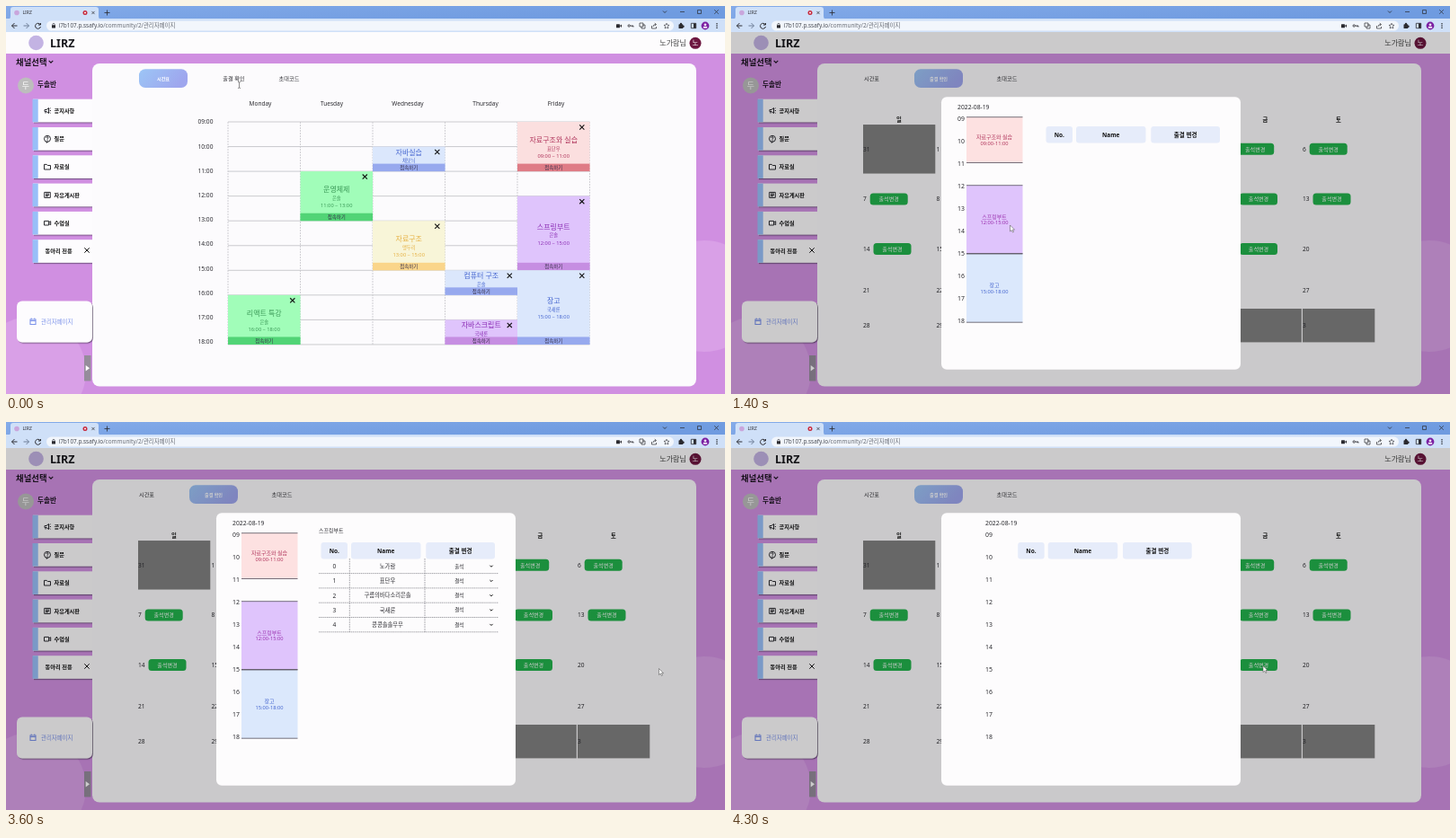
Animation, 800 px wide and 432 px high, one loop 4.4 s. Source, as an HTML page:

```html
<!DOCTYPE html>
<html lang="ko">
<head>
<meta charset="utf-8">
<title>관리자페이지</title>
<style>
  html, body { margin: 0; width: 100%; height: 100%; overflow: hidden; background: #d08fe1; }
  svg { display: block; width: 100vw; height: 100vh; }
  text { font-family: "Noto Sans", "Noto Sans CJK KR", "Noto Sans CJK", sans-serif; white-space: pre; }
</style>
</head>
<body>
<svg id="stage" viewBox="0 0 800 432"></svg>
<script>
const INK = '#2b2b30';

// Markup helpers
const rect = (x, y, w, h, fill, r = 0, extra = '') =>
  `<rect x="${x}" y="${y}" width="${w}" height="${h}" rx="${r}" fill="${fill}" ${extra}/>`;
const circle = (x, y, r, fill) => `<circle cx="${x}" cy="${y}" r="${r}" fill="${fill}"/>`;
const text = (s, x, y, size, fill = INK, anchor = 'middle', weight = 400) =>
  `<text x="${x}" y="${y + size * 0.37}" font-size="${size}" fill="${fill}" text-anchor="${anchor}" font-weight="${weight}">${s}</text>`;
const left = (s, x, y, size, fill, weight) => text(s, x, y, size, fill, 'start', weight);
const stroke = (d, color = INK, width = 1, extra = '') =>
  `<path d="${d}" fill="none" stroke="${color}" stroke-width="${width}" ${extra}/>`;
const icon = (x, y, d, color = INK, width = 1) =>
  `<g transform="translate(${x} ${y})">${stroke(d, color, width)}</g>`;
const group = (id, body) => `<g id="${id}">${body}</g>`;
const cross = (x, y, r, color = '#111', width = 1) =>
  icon(x, y, `M${-r} ${-r}L${r} ${r}M${r} ${-r}L${-r} ${r}`, color, width);
const range = n => [...Array(n).keys()];

const BOX = 'M-3-2.5H3V3H-3Z';
const RING = 'M-3.5 0a3.5 3.5 0 1 0 7 0a3.5 3.5 0 1 0-7 0';

function browserBar() {
  return rect(0, 0, 800, 15, 'url(#strip)') +
    `<path d="M2 15Q5 15 5 11V4Q5 1 8 1H100Q103 1 103 4V11Q103 15 106 15Z" fill="#cfe0f8"/>` +
    rect(0, 14, 800, 15, '#cfe0f8') +
    circle(12, 7.5, 2.8, '#c9a6dc') + left('LIRZ', 18.5, 7.5, 5) +
    circle(88, 7.5, 2.5, '#c6283c') + circle(88, 7.5, 1, '#fff') +
    cross(97, 7.5, 1.6, INK, .7) +
    icon(112.5, 7.5, 'M-3 0H3M0-3V3', INK, .8) +
    icon(733, 6.5, 'M-2-1L0 1L2-1', INK, .8) +
    icon(752.5, 6.5, 'M-2.5 0H2.5', INK, .7) +
    icon(771.5, 6.5, 'M-2-2H2V2H-2Z', INK, .7) +
    cross(790.5, 6.5, 2.3, INK, .7) +
    icon(9.5, 22, 'M3 0H-3M0-3L-3 0L0 3') +
    icon(22.5, 22, 'M-3 0H3M0-3L3 0L0 3', '#6f7f98') +
    icon(35.5, 22, 'M2.5-1.5A3 3 0 1 0 3 1M3-3V-1H.5') +
    rect(45, 16.5, 698, 11, '#f2f6fc', 5.5) +
    rect(51, 21.3, 4, 3.2, INK, .5) + icon(53, 21, 'M-1.2 1V-.5a1.2 1.2 0 0 1 2.4 0V1', INK, .6) +
    left('i7b107.p.ssafy.io<tspan fill="#6a6e76">/community/2/관리자페이지</tspan>', 58.5, 22, 6.4, '#4a4d54') +
    rect(679, 20.2, 4, 4, INK, .5) + `<path d="M683 22L685 20.5V24Z" fill="${INK}"/>` +
    icon(695, 22, 'M-3 0a1.2 1.2 0 1 0 2.4 0a1.2 1.2 0 1 0-2.4 0M-.6 0H3V1.5M1.7 0V1.2', INK, .8) +
    icon(708, 22, 'M-3-3H1V1H-3ZM0-1H3V3H-1V1', INK, .7) +
    icon(721, 22, 'M-2.5 0V3H2.5V1M-1 1Q-1-1.5 2-1.5M.8-3L2.5-1.5L.8 0', INK, .7) +
    icon(735, 22.2, 'M0-3L.9-1L3-.9L1.4.6L1.9 2.8L0 1.6L-1.9 2.8L-1.4.6L-3-.9L-.9-1Z', INK, .6) +
    rect(748.5, 20.3, 4.8, 4.8, INK, .7) + circle(751, 20, 1.2, INK) + circle(753.5, 22.7, 1.2, INK) +
    icon(765, 22, 'M-2.7-2.7H2.7V2.7H-2.7Z', INK, .8) + rect(765, 19.3, 2.7, 5.4, INK) +
    circle(778, 22, 4.4, '#7b1fa2') + circle(778, 20.8, 1.4, '#f0e4f5') + rect(775.7, 22.7, 4.6, 2, '#f0e4f5', 1) +
    [-2.3, 0, 2.3].map(d => circle(791, 22 + d, .8, INK)).join('');
}

function sidebar() {
  const menu = [
    ['공지사항', 'M-3-1H-1L1.5-3V3L-1 1H-3ZM-2 1V3M2.7 0H4M2.6-2L3.6-2.8M2.6 2L3.6 2.8'],
    ['질문', RING + 'M-1.2-1Q-1-2.2 0-2.1Q1.5-1.8.9-.6Q0 0 0 .8M0 1.5V2.2M-1 3L-1 4.5L1 3'],
    ['자료실', 'M-3.5-2.7H-.7L.3-1.6H3.5V2.9H-3.5Z'],
    ['자유게시판', 'M-3.3-3H3.3V3H-3.3ZM-2-1.4H2M-2 0H2M-2 1.4H1'],
    ['수업실', 'M-3.5-2.3H1.6V2.3H-3.5ZM1.6-.5L3.7-2V2L1.6.5'],
    ['동아리 전용', '']
  ];
  const items = menu.map(([label, d], i) => {
    const y = 103.7 + i * 31.3, mid = y + 12.8;
    return rect(30, y, 66, 25.6, '#fdfcfe', 0, 'filter="url(#shadow)"') + rect(29.5, y, 6.2, 25.6, '#98bff8') +
      (d ? icon(46, mid, d) + left(label, 53.5, mid, 6.2, '#111', 700)
         : left(label, 43.5, mid, 6.2, '#111', 700) + cross(90, mid - 1, 2.7));
  }).join('');
  return left('채널선택', 11, 63, 9.4, '#1c1420', 700) + icon(50, 62, 'M-2.3-1.2L0 1.2L2.3-1.2', '#1c1420', 1.1) +
    circle(22, 88.5, 9, '#bdbdbd') + text('두', 22, 88.5, 9, '#fff') +
    left('두솔반', 35, 87, 7.6, '#1c1420', 700) + items;
}

const adminCard = () =>
  rect(12, 328.5, 84, 46, '#fdfcfe', 6, 'filter="url(#shadow)"') +
  icon(30, 351.5, BOX + 'M-3-1H3M-1.8-4V-2M1.8-4V-2', '#7d93ea', 1.1) +
  left('관리자페이지', 39, 351.5, 6.4, '#7d93ea', 500) +
  rect(87, 389, 7.5, 28.5, '#958c9b') + '<path d="M88.7 400L93 403.3L88.7 406.6Z" fill="#fff"/>';

function page() {
  return rect(0, 29, 800, 403, '#d08fe1') + circle(28, 407, 61, '#d9a0e7') + circle(777, 323, 62, '#d9a0e7') +
    rect(0, 29, 800, 24, '#fdfcfd') + circle(33.5, 41, 8.3, '#c3b3e3') +
    left('LIRZ', 49, 41, 12.5, '#17171c', 600) +
    text('노가람님', 757, 41.3, 8.1, '#444', 'end') + circle(767, 41.3, 6.5, '#6d1740') + text('노', 767, 41, 7.5, '#fff') +
    sidebar() + rect(96, 64, 672, 359.5, '#fcfbfd', 8) + adminCard();
}

const tabButton = (label, x, fill) =>
  rect(x, 70.3, 54, 20.7, fill, 7) + text(label, x + 27, 80.8, 5.1, '#fff', 'middle', 700);

function timetable() {
  const themes = {
    blue: ['#dbe7fc', '#97a9ee', '#4767d0'], green: ['#a1fdb9', '#51d476', '#3c9a58'],
    cream: ['#f8f5d8', '#fad58a', '#e6b040'], purple: ['#dfc4fc', '#c68ee2', '#8d2fb5'],
    pink: ['#fbdfdf', '#df7c86', '#b0355c']
  };
  const X0 = 247, Y0 = 129, W = 80.5, H = 27.55, LABEL_STEP = 27.2;
  const lessons = [
    [0, 16, 18, 'green', '리액트 특강', '은솔'], [1, 11, 13, 'green', '운영체제', '은솔'],
    [2, 10, 11, 'blue', '자바실습', '채보늬'], [2, 13, 15, 'cream', '자료구조', '맹두리'],
    [3, 15, 16, 'blue', '컴퓨터 구조', '은솔'], [3, 17, 18, 'purple', '자바스크립트', '국새론'],
    [4, 9, 11, 'pink', '자료구조와 실습', '표단우'], [4, 12, 15, 'purple', '스프링부트', '은솔'],
    [4, 15, 18, 'blue', '장고', '국새론']
  ];
  const hour = h => String(h).padStart(2, '0') + ':00';
  const blocks = lessons.map(([day, from, to, theme, name, teacher]) => {
    const [fill, foot, ink] = themes[theme];
    const x = X0 + day * W, y = Y0 + (from - 9) * H, h = (to - from) * H, cx = x + W / 2;
    const short = to - from === 1, mid = y + (h - 8.5) / 2;
    return rect(x, y, W, h, fill) + rect(x, y + h - 8.5, W, 8.5, foot) +
      text('접속하기', cx, y + h - 4.2, 5.5, '#37304a') +
      text(name, cx, short ? y + 6 : mid - 3, 8, ink) +
      text(teacher, cx, short ? y + 15.4 : mid + 6.5, 5.3, ink) +
      (short ? '' : text(`${hour(from)} ~ ${hour(to)}`, cx, mid + 14.7, 5.7, ink)) +
      cross(x + W - 8.7, y + 6, 2.6, '#111', 1.1);
  }).join('');
  const days = ['Monday', 'Tuesday', 'Wednesday', 'Thursday', 'Friday'];
  return tabButton('시간표', 148, 'url(#tab)') + text('출결 확인', 253.5, 80.8, 6.2) + text('초대코드', 315, 80.8, 6.2) +
    days.map((d, i) => text(d, [283, 362.5, 447, 533.5, 612][i], 108.5, 6.5)).join('') +
    range(10).map(i => text(hour(i + 9), 222, Y0 + i * LABEL_STEP, 6.6) +
      stroke(`M${X0} ${Y0 + i * H}H${X0 + 5 * W}`, '#c6c6ca', .9)).join('') +
    range(6).map(i => stroke(`M${X0 + i * W} ${Y0}V${Y0 + 9 * H}`, '#c6c6ca', .8, 'stroke-dasharray="2 1"')).join('') +
    blocks;
}

function calendar() {
  const colX = i => 147 + i * 81.5;
  const rowY = [159.3, 215, 270.5, 317, 355.7];
  const cells = range(35).map(i => {
    const x = colX(i % 7), row = Math.floor(i / 7), y = rowY[row];
    const day = (i + 30) % 31 + 1, outside = i === 0 || i > 31;
    const h = row ? 37.4 : 54.5;
    const bx = x + (day > 9 ? 11.5 : 7.7);
    return (outside ? rect(x, y - h / 2, 80.3, h, '#808080') : '') +
      left(day, x, y, 6.6) +
      (i > 0 && i < 20 ? rect(bx, y - 6.5, 42, 13, '#22b24c', 3.5) + text('출석변경', bx + 21, y, 6.1, '#fff') : '');
  }).join('');
  return text('시간표', 156.5, 80.8, 6.2) + text('초대코드', 307, 80.8, 6.2) +
    group('tabPlain', tabButton('출결 확인', 204, 'url(#tab)')) +
    group('tabHover', tabButton('출결 확인', 204, 'url(#tabDark)')) +
    icon(357, 112.5, 'M2-4L-2 0L2 4', '#111', 1.3) + icon(506, 112.5, 'M-2-4L2 0L-2 4', '#111', 1.3) +
    text('2022 년 08 월', 432, 113, 6.7) +
    [...'일월화수목금토'].map((d, i) => text(d, colX(i) + 40, 126.7, 6.3, '#111', 'middle', 700)).join('') + cells;
}

function modal() {
  const hours = left('2022-08-19', 252, 112.3, 6.8) +
    range(10).map(i => left(String(i + 9).padStart(2, '0'), 252, 125 + i * 25, 6.9)).join('');
  const lessons = [
    [123.7, 50.8, '#fde1e1', '#b0355c', '자료구조와 실습', '09:00-11:00'],
    [199.7, 75.8, '#dfc4fc', '#9a2fae', '스프링부트', '12:00-15:00'],
    [276, 76.2, '#dbe8fc', '#4767d0', '장고', '15:00-18:00']
  ].map(([y, h, fill, ink, name, time]) =>
    rect(262, y, 62.5, h, fill) + stroke(`M262 ${y}h62.5M262 ${y + h}h62.5`, '#55505c', .8) +
    text(name, 293, y + h / 2 - 3, 6, ink) + text(time, 293, y + h / 2 + 3.5, 5.7, ink)).join('');
  const heads = [['No.', 350.5, 29.5], ['Name', 384, 77.5], ['출결 변경', 467.3, 76.7]].map(([s, x, w]) =>
    rect(x, 134, w, 18.4, '#e6ecfa', 3) + text(s, x + w / 2, 143.2, 6.5, '#111', 'middle', 700)).join('');
  const names = ['노가람', '표단우', '구름의바다소리은솔', '국새론', '콩콩솔솔무무'];
  const rows = names.map((name, i) => {
    const y = 160.5 + i * 16.3;
    const status = i ? text('결석', 504.3, y, 5.6)
      : group('absent', text('결석', 504.3, y, 5.6)) + group('present', text('출석', 504.3, y, 5.6));
    return text(i, 365.5, y, 6.6) + text(name, 424.5, y, 6.3) + status +
      icon(540, y, 'M-1.6-.8L0 .8L1.6-.8', '#111', 1) +
      stroke(`M348 ${y + 8.1}H548`, '#8c8c92', .8, 'stroke-dasharray="1.2 .6"');
  }).join('');
  return rect(0, 29, 800, 403, '#000', 0, 'opacity=".2"') + rect(234, 101.3, 333, 303.4, '#fdfcfd', 6) +
    group('hours', hours) + group('heads', heads) + group('lessons', lessons) +
    group('roster', left('스프링부트', 348, 121, 6) + rows +
      stroke('M382.3 152V234M466 152V234', '#8c8c92', .8, 'stroke-dasharray="1.6 1"'));
}

const cursors =
  group('arrow', '<path d="M0 0V7L1.7 5.5L2.9 8L4 7.5L2.9 5.1H5Z" fill="#fff" stroke="#444" stroke-width=".5"/>') +
  group('hand', '<path d="M-1 1Q0-1 1 1V4L4 4.8Q5 5.2 4.5 7L3.6 10H-.8L-3 6.4Q-3 5-1 6Z" fill="#fff" stroke="#333" stroke-width=".6"/>') +
  group('beam', stroke('M-1.5-3.5Q0-3.5 0-2.5Q0-3.5 1.5-3.5M0-2.5V2.5M-1.5 3.5Q0 3.5 0 2.5Q0 3.5 1.5 3.5', '#444', .6));

const gradient = (id, a, b) =>
  `<linearGradient id="${id}" x2="1" y2=".35"><stop stop-color="${a}"/><stop offset="1" stop-color="${b}"/></linearGradient>`;

document.getElementById('stage').innerHTML =
  `<defs>${gradient('strip', '#84abe9', '#6f9be0')}${gradient('tab', '#9cc6f6', '#9ea6ee')}${gradient('tabDark', '#84aee4', '#7f92da')}
  <filter id="shadow" x="-20%" y="-20%" width="140%" height="150%"><feDropShadow dx="1" dy="1.2" stdDeviation=".7" flood-color="#403050" flood-opacity=".6"/></filter></defs>` +
  page() + group('timetable', timetable()) + group('calendar', calendar()) + group('modal', modal()) +
  browserBar() + group('cursor', cursors);

const LOOP = 4400, STEP = 100;
const TAB_CLICK = 400, OPEN = 1300, LOADED = 1400, ROSTER = 1500, MARKED = 2800, CLOSE = 3700, REOPEN = 4300;

// time, x, y, shape
const path = [
  [0, 259.5, 88, 'beam'], [TAB_CLICK, 258, 83, 'hand'], [600, 258, 83, 'arrow'],
  [1100, 588, 271, 'hand'], [1200, 588, 271, 'arrow'], [LOADED, 310.5, 244, 'arrow'], [ROSTER, 310.5, 244, 'arrow'],
  [2000, 506, 158, 'arrow'], [2300, 506, 158, 'arrow'], [2600, 515.5, 179, 'arrow'], [MARKED, 515.5, 179, 'arrow'],
  [3400, 726.5, 274.5, 'arrow'], [3800, 726.5, 274.5, 'arrow'], [4200, 592, 271.5, 'hand'],
  [REOPEN, 592, 271.5, 'arrow'], [LOOP, 592, 271.5, 'arrow']
];
const el = id => document.getElementById(id);
const show = (id, on) => { el(id).style.display = on ? '' : 'none'; };
const ease = p => p * p * (3 - 2 * p);

function render(t) {
  const i = path.findIndex((k, n) => t >= k[0] && t < path[n + 1][0]);
  const [t0, x0, y0, shape] = path[i], [t1, x1, y1] = path[i + 1];
  const p = shape === 'beam' ? 0 : ease((t - t0) / (t1 - t0));
  el('cursor').setAttribute('transform', `translate(${x0 + (x1 - x0) * p} ${y0 + (y1 - y0) * p})`);
  ['arrow', 'hand', 'beam'].forEach(s => show(s, s === shape));

  const loaded = t >= LOADED && t < CLOSE;
  show('timetable', t < TAB_CLICK);
  show('calendar', t >= TAB_CLICK);
  show('tabHover', t <= 600);
  show('tabPlain', t > 600);
  show('modal', t >= OPEN && t < CLOSE || t >= REOPEN);
  show('lessons', loaded);
  show('roster', t >= ROSTER && loaded);
  show('absent', t < MARKED);
  show('present', t >= MARKED);
  el('hours').setAttribute('transform', `translate(${loaded ? 0 : 31} 0)`);
  el('heads').setAttribute('transform', `translate(${loaded ? 0 : -31.3} 0)`);
}

const start = performance.now();
function tick() {
  const t = Math.max(0, performance.now() - start) % LOOP;
  render(Math.floor(t / STEP) * STEP);
  requestAnimationFrame(tick);
}
tick();
</script>
</body>
</html>
```
